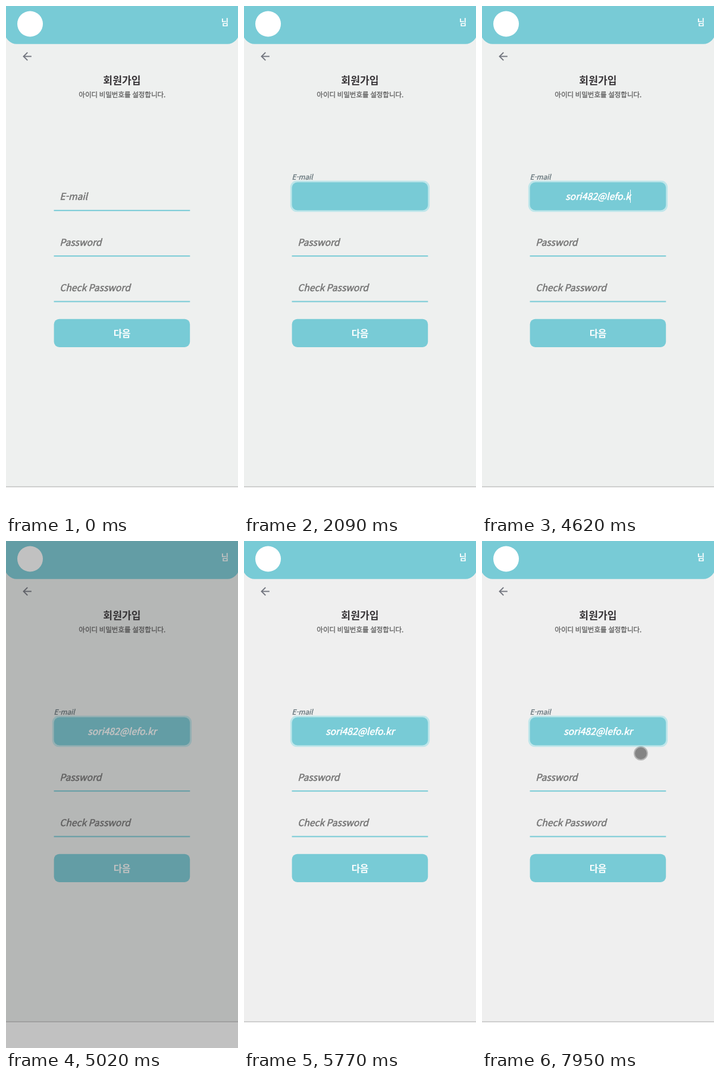
These frames come from a looping animation (390x850 px, 8 s). An HTML page with a canvas:

```html
<!DOCTYPE html>
<html lang="ko">
<head>
<meta charset="utf-8">
<title>회원가입</title>
<style>
  html, body { margin: 0; width: 100%; height: 100%; overflow: hidden; background: #eef0ef; }
  canvas { display: block; }
</style>
</head>
<body>
<canvas id="stage" width="390" height="850"></canvas>
<script>
const ctx = document.getElementById('stage').getContext('2d');
const LOOP = 8000;
const FOCUS = 1490, CARET_OFF = 2090, TYPING = 2620, SUBMIT = 5020, SHEET_IN = 5100, CLOSE = 5770;
const TEAL = '#78cbd6', HINT = '#757575';
const SANS = '"Noto Sans CJK KR", "Noto Sans KR", "Noto Sans CJK JP", "Noto Sans", sans-serif';

// Steady typing in three bursts.
const BURSTS = [
  { keys: 'sori', start: TYPING, step: 87 },
  { keys: '482@', start: 3080, step: 150 },
  { keys: 'lefo.kr', start: 3800, step: 137 }
];

// Each move eases from one point to the next, then rests until its end.
const MOVES = [
  { start: 200, length: 410, end: 1560, from: [384, 802], to: [191, 318] },
  { start: 1560, length: 260, end: 1890, from: [191, 318], to: [318, 355] },
  { start: 6370, length: 740, end: 7180, from: [371, 386], to: [120, 313], bend: -12 },
  { start: 7180, length: 770, end: LOOP, from: [120, 313], to: [267, 356] }
];

const mix = (a, b, p) => a + (b - a) * p;
const easeOut = p => 1 - (1 - p) ** 3;
const smooth = p => p * p * (3 - 2 * p);
const progress = (t, start, length) => Math.max(0, Math.min(1, (t - start) / length));

function box(x, y, w, h, r, fill) {
  ctx.beginPath();
  ctx.roundRect(x, y, w, h, r);
  ctx.fillStyle = fill;
  ctx.fill();
}

function disc(x, y, r, fill) {
  ctx.beginPath();
  ctx.arc(x, y, r, 0, 2 * Math.PI);
  ctx.fillStyle = fill;
  ctx.fill();
}

function line(points, color, width) {
  ctx.beginPath();
  points.forEach(([x, y]) => ctx.lineTo(x, y));
  ctx.lineJoin = 'miter';
  ctx.strokeStyle = color;
  ctx.lineWidth = width;
  ctx.stroke();
}

// A thin outline of the given weight stands for a medium cut of the font.
function text(str, x, y, size, color, { style = '', align = 'center', weight = 0, font = SANS } = {}) {
  ctx.font = `${style} ${size}px ${font}`;
  ctx.textAlign = align;
  ctx.fillStyle = color;
  ctx.fillText(str, x, y);
  if (weight) {
    ctx.lineJoin = 'round';
    ctx.strokeStyle = color;
    ctx.lineWidth = weight;
    ctx.strokeText(str, x, y);
  }
  return ctx.measureText(str).width;
}

const bold = (str, x, y, size, color) => text(str, x, y, size, color, { style: 'bold' });
const slanted = (str, x, y, size, color, align = 'left', weight = 0.55) =>
  text(str, x, y, size, color, { style: 'italic', align, weight });

function underline(y) {
  ctx.fillStyle = TEAL;
  ctx.fillRect(80.5, y, 228.8, 2);
}

function drawPage(t) {
  ctx.fillStyle = t < CLOSE ? '#eef0ef' : '#efefef';
  ctx.fillRect(0, 0, 390, 850);

  box(-2, -30, 394, 93.7, 20, TEAL);
  disc(40.5, 30, 21.5, '#fff');
  bold('님', 368, 32, 13.4, '#fff');

  line([[29.5, 84.5], [42.8, 84.5]], '#73767f', 1.9);
  line([[36.2, 77.8], [29.5, 84.5], [36.2, 91.2]], '#73767f', 1.9);

  bold('회원가입', 195, 130.7, 17.2, '#383538');
  text('아이디 비밀번호를 설정합니다.', 195.3, 152.8, 11.5, '#646464', { weight: 0.35 });

  ['Password', 'Check Password'].forEach((label, i) => {
    slanted(label, 90.2, 401.7 + 76.3 * i, 15.7, HINT);
    underline(418.2 + 76.3 * i);
  });

  box(80.6, 524.7, 228.6, 47.3, 9, TEAL);
  bold('다음', 195, 554.8, 15.6, '#fff');

  ctx.fillStyle = '#fff';
  ctx.fillRect(0, 806, 390, 44);
  ctx.fillStyle = '#cfcfcf';
  ctx.fillRect(0, 805, 390, 2);
}

function drawEmail(t) {
  const p = easeOut(progress(t, FOCUS, 260));
  ctx.globalAlpha = 1 - p;
  underline(341.8);
  ctx.globalAlpha = p;
  box(77.8, 292.8, 234.3, 52.4, 11, '#bfe6ea');
  box(80.6, 295.5, 228.6, 47, 9, TEAL);
  ctx.globalAlpha = 1;
  slanted('E-mail', mix(90.2, 80.5, p), mix(325, 291, p), mix(15.7, 11.8, p),
    p < 0.5 ? HINT : '#66757b', 'left', mix(0.55, 0.35, p));

  const typed = BURSTS.map(({ keys, start, step }) =>
    keys.slice(0, Math.max(0, Math.floor((t - start) / step) + 1))).join('');
  const width = slanted(typed, 195, 325, 15.8, '#fff', 'center', 0.6);
  if ((t >= FOCUS + 70 && t < CARET_OFF) || (t >= TYPING && t < SUBMIT)) {
    ctx.fillStyle = '#fff';
    ctx.fillRect(Math.round(195 + width / 2 - 1), 308, 1, 22);
  }
}

function drawSheet(t) {
  if (t < SUBMIT || t >= CLOSE) return;
  ctx.fillStyle = 'rgba(51,51,51,.3)';
  ctx.fillRect(0, 0, 390, 850);
  ctx.save();
  ctx.translate(0, 151 * (1 - easeOut(progress(t, SHEET_IN, 410))));
  box(9, 699.3, 372.3, 200, 20, '#fff');
  line([[187, 727], [203.5, 743.5]], '#d68b69', 2.6);
  line([[203.5, 727], [187, 743.5]], '#d68b69', 2.6);
  text('이미 등록된 이메일입니다.', 195.5, 781.3, 15.4, '#333', { weight: 0.6 });
  box(235.5, 798.5, 101.5, 30.5, 15.25, '#c3eaef');
  box(238.5, 801.5, 95.5, 24.5, 12.25, '#fff');
  ctx.letterSpacing = '0.4px';
  text('close', 286.2, 820, 14.5, '#222', { style: 'italic', font: 'Roboto, sans-serif' });
  ctx.restore();
}

function drawPointer(t) {
  const move = MOVES.find(m => t >= m.start && t < m.end);
  if (!move) return;
  const { start, length, from, to, bend = 0 } = move;
  const p = smooth(progress(t, start, length));
  const x = mix(from[0], to[0], p);
  const y = mix(from[1], to[1], p) + bend * Math.sin(Math.PI * p);
  disc(x, y, 12, 'rgba(0,0,0,.24)');
  disc(x, y, 10, 'rgba(0,0,0,.27)');
}

const start = performance.now();

function frame() {
  const t = (performance.now() - start) % LOOP;
  drawPage(t);
  drawEmail(t);
  drawSheet(t);
  drawPointer(t);
  requestAnimationFrame(frame);
}
frame();
</script>
</body>
</html>
```
